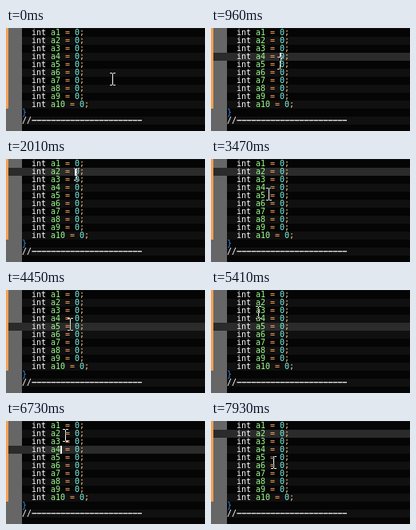
Recreate the animation shown at these times as an HTML page. Size 249 by 129 pixels, loop 8 s.

```html
<!DOCTYPE html>
<html lang="en">
<head>
<meta charset="utf-8">
<title>Editor caret</title>
<style>
  html, body { margin: 0; width: 100%; height: 100%; overflow: hidden; background: #050505; }
  svg { display: block; width: 249px; height: 129px; }
  text {
    font: 10px "DejaVu Sans Mono", "Noto Sans Mono", monospace;
    letter-spacing: -.02px;
    white-space: pre;
    fill: #fff;
  }
  .name { fill: #9cff8c; }
  .op { fill: #ffa65c; }
  .num { fill: #7cf4e4; }
  .end { fill: #ffc888; }
  .brace { fill: #3a90f0; }
  .rule { stroke: #fff; stroke-width: .3px; }
  #pointer { fill: #fff; mix-blend-mode: difference; }
</style>
</head>
<body>
<svg viewBox="0 0 249 129" shape-rendering="crispEdges">
  <defs>
    <pattern id="stripes" y="1" width="249" height="20" patternUnits="userSpaceOnUse">
      <rect width="249" height="10" fill="#050505"/>
      <rect y="10" width="249" height="10" fill="#101010"/>
    </pattern>
  </defs>
  <rect width="249" height="129" fill="url(#stripes)"/>
  <rect width="20" height="129" fill="#666"/>
  <rect width="3" height="101" fill="#f5a050"/>
  <rect id="line" x="3" width="246" height="10" fill="#2b2b2b"/>
  <g id="code"></g>
  <rect id="caret" width="2" height="10" fill="#fff"/>
  <path id="pointer" d="M-3-8h3v1h1v-1h3v1h-3v14h3v1h-3v-1h-1v1h-3v-1h3v-14h-3z"/>
</svg>
<script>
const LOOP = 8000, STEP = 60, BLINK = 530;
const $ = id => document.getElementById(id);
const rowTop = row => row * 10 - 9;
const colX = col => 20 + col * 6;

// Code listing
const span = (kind, text) => `<tspan class="${kind}">${text}</tspan>`;
const put = (row, col, html) =>
  `<text x="${colX(col)}" y="${rowTop(row) + 8}">${html}</text>`;
let listing = '';
for (let i = 1; i <= 10; i++) {
  listing += put(i, 2, 'int ' + span('name', 'a' + i) + ' ' + span('op', '=') + ' ' +
    span('num', '0') + span('end', ';'));
}
listing += put(11, 0, span('brace', '}'));
listing += put(12, 0, '//' + span('rule', '\u2212'.repeat(23)));
$('code').innerHTML = listing;

// Pointer moves: first step, last step, destination
const START = [133, 64];
const MOVES = [
  [460, 520, 64, 34],
  [720, 960, 86, 44],
  [1020, 1690, 88, 19],
  [2210, 2870, 72, 44],
  [4450, 4810, 211, 34],
  [4870, 5230, 72, 28],
  [5290, 5410, 59, 28],
  [5870, 6050, 68, 32],
  [6550, 6730, 74, 18],
  [7320, 7800, 78, 52]
];

// Clicks: time, row, column
const CLICKS = [
  [960, 4, 11], [1880, 2, 11], [3670, 5, 8],
  [5540, 3, 6], [6490, 4, 8], [6990, 2, 9]
];

const ease = u => u * u * (3 - 2 * u);

function pointerAt(t) {
  let [x, y] = START;
  for (const [from, to, endX, endY] of MOVES) {
    if (t < from) break;
    const steps = Math.round((to - from) / STEP) + 1;
    const done = Math.min(steps, Math.floor((t - from) / STEP) + 1);
    const u = ease(done / steps);
    x += (endX - x) * u;
    y += (endY - y) * u;
  }
  return [Math.round(x), Math.round(y)];
}

function place(el, shown, x, y) {
  el.style.display = shown ? '' : 'none';
  el.setAttribute('transform', `translate(${x} ${y})`);
}

function draw(t) {
  const click = CLICKS.filter(([time]) => time <= t).pop();
  const [time, row, col] = click || [0, 0, 0];
  const lit = click && Math.floor((t - time) / BLINK) % 2 === 0;
  place($('line'), click, 0, rowTop(row));
  place($('caret'), lit, colX(col), rowTop(row));
  place($('pointer'), true, ...pointerAt(t));
}

const born = performance.now();
function tick() {
  draw((performance.now() - born) % LOOP);
  requestAnimationFrame(tick);
}
tick();
</script>
</body>
</html>
```
